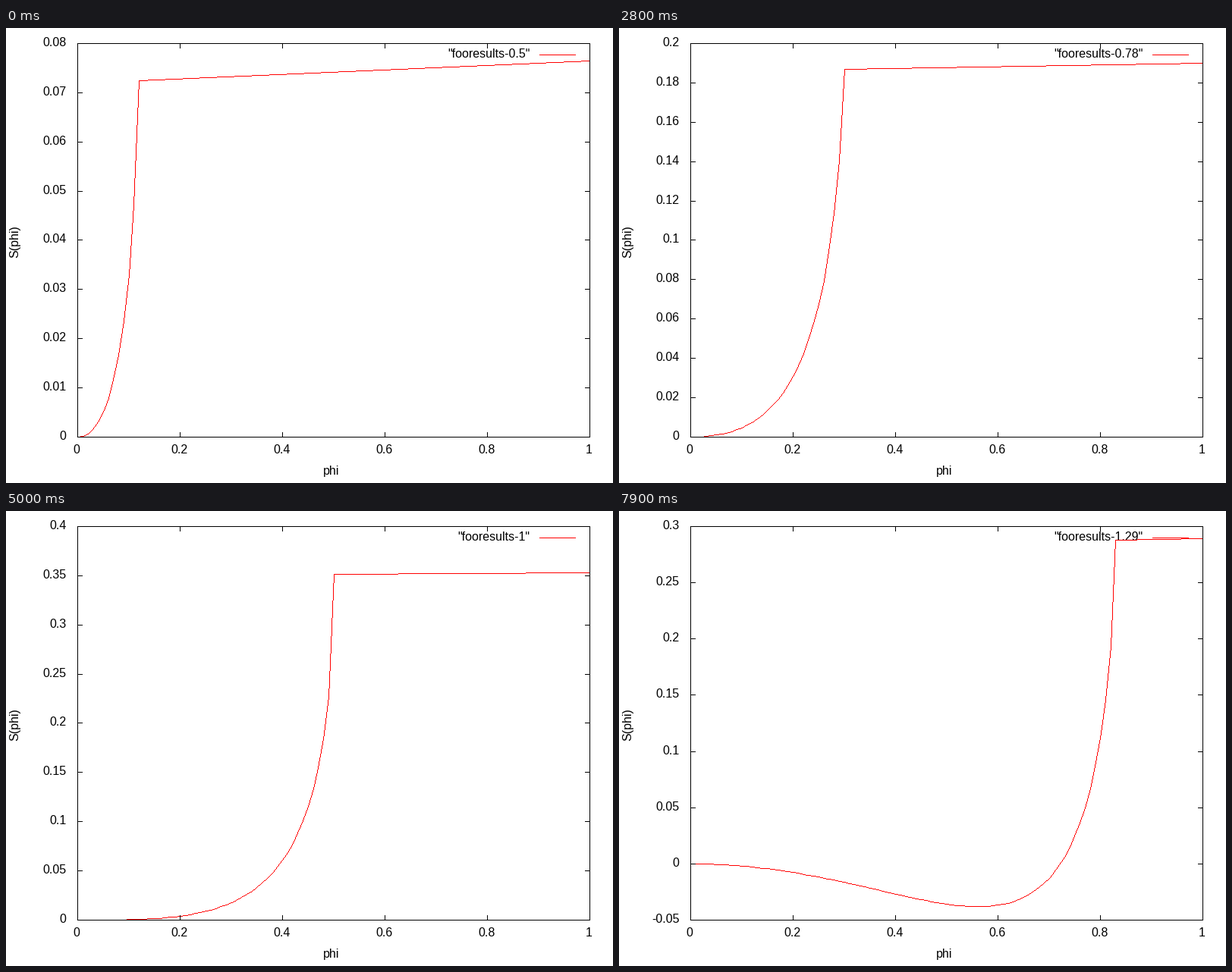
Animation, 800 px wide and 600 px high, one loop 8 s. Source, as a matplotlib script:

```python
import numpy as np
import matplotlib.pyplot as plt
from matplotlib.animation import FuncAnimation

W, H, DPI = 800, 600, 100
LEFT, RIGHT, TOP, BOTTOM = 94, 769, 20, 539
TIC = 6
BEARING = 0.7  # matplotlib adds the first glyph's side bearing to x
FRAMES, INTERVAL = 80, 100

plt.rcParams["font.family"] = "Liberation Sans"
plt.rcParams["font.size"] = 16 * 72 / DPI

fig = plt.figure(figsize=(W / DPI, H / DPI), dpi=DPI, facecolor="white")
ax = fig.add_axes([0, 0, 1, 1])
ax.set(xlim=(0, W), ylim=(H, 0))
ax.axis("off")


def potential(phi, mach):
    """Sagdeev potential of an ion-acoustic wave."""
    root = np.sqrt(np.maximum(1 - 2 * phi / mach**2, 0))
    return 1 - np.exp(phi) + mach**2 * (1 - root)


def tic_step(span):
    power = 10.0 ** np.floor(np.log10(span))
    norm = span / power
    return power * (0.2 if norm < 2 else 0.5 if norm < 5 else 1)


def nearest(v):
    return np.floor(np.asarray(v) + 0.5)


def trace(points):
    """Whole pixels along a polyline, without antialiasing."""
    points = nearest(points)
    runs = []
    for a, b in zip(points[:-1], points[1:]):
        n = int(np.abs(b - a).max()) + 1
        runs.append(nearest(np.linspace(a, b, n)))
    return np.vstack(runs)


def pixels(color, zorder):
    return ax.plot([], [], ",", color=color, zorder=zorder)[0]


def put(dots, *runs):
    x, y = np.vstack(runs).T
    dots.set_data(x, y + 1)  # a pixel marker fills the row above its point


def label(x, y, text="", ha="center", **kw):
    return ax.text(x - BEARING, y, text, ha=ha, va="baseline", **kw)


def curve(mach):
    last = int(np.floor(50 * mach**2 + 1e-6))
    phi = np.arange(last + 1) / 100
    s = potential(phi, mach)
    step = tic_step(s.max() - s.min())
    lo = int(np.floor(s.min() / step))
    hi = int(np.ceil(s.max() / step - 1e-9))

    # Undefined rows are read as (row number, phi), far off to the right.
    row = last + 1
    slope = (row / 100 - s[-1]) / (row - phi[-1])
    run = min(1 - phi[-1], (hi * step - s[-1]) / slope)
    phi = np.append(phi, phi[-1] + run)
    s = np.append(s, s[-1] + slope * run)
    return phi, s, step, lo, hi


# Static parts
for i in range(6):
    label(LEFT + 135 * i, 561, f"{i / 5:g}")
label(429.5, 589, "phi")
label(17, 281.5, "S(phi)", rotation=90, rotation_mode="anchor")

frame = [trace([(LEFT, TOP), (RIGHT, TOP), (RIGHT, BOTTOM),
                (LEFT, BOTTOM), (LEFT, TOP)])]
for x in range(LEFT + 135, RIGHT, 135):
    frame.append(trace([(x, TOP), (x, TOP + TIC)]))
    frame.append(trace([(x, BOTTOM - TIC), (x, BOTTOM)]))
put(pixels("black", 5), *frame)
put(pixels("red", 4), trace([(703, 35), (750, 35)]))

# Moving parts
line = pixels("red", 4)
tics = pixels("black", 5)
key = label(691, 39, ha="right")
tic_labels = [label(80, 0, ha="right") for _ in range(14)]


def update(k):
    mach = 0.5 + k / 100
    phi, s, step, lo, hi = curve(mach)

    def row(v):
        return BOTTOM - nearest((BOTTOM - TOP) * (v / step - lo) / (hi - lo))

    x = LEFT + (RIGHT - LEFT) * phi
    put(line, trace(np.column_stack([x, row(s)])))
    key.set_text(f'"fooresults-{mach:g}"')

    marks = []
    for i, text in enumerate(tic_labels):
        value = (lo + i) * step
        if lo + i > hi:
            text.set_text("")
            continue
        y = row(value)
        text.set_text(f"{value:g}")
        text.set_y(y + 4)
        marks.append(trace([(LEFT, y), (LEFT + TIC, y)]))
        marks.append(trace([(RIGHT - TIC, y), (RIGHT, y)]))
    put(tics, *marks)
    return [line, tics, key, *tic_labels]


anim = FuncAnimation(fig, update, frames=FRAMES, interval=INTERVAL,
                     repeat=True, repeat_delay=0, blit=False)
plt.show()
```
